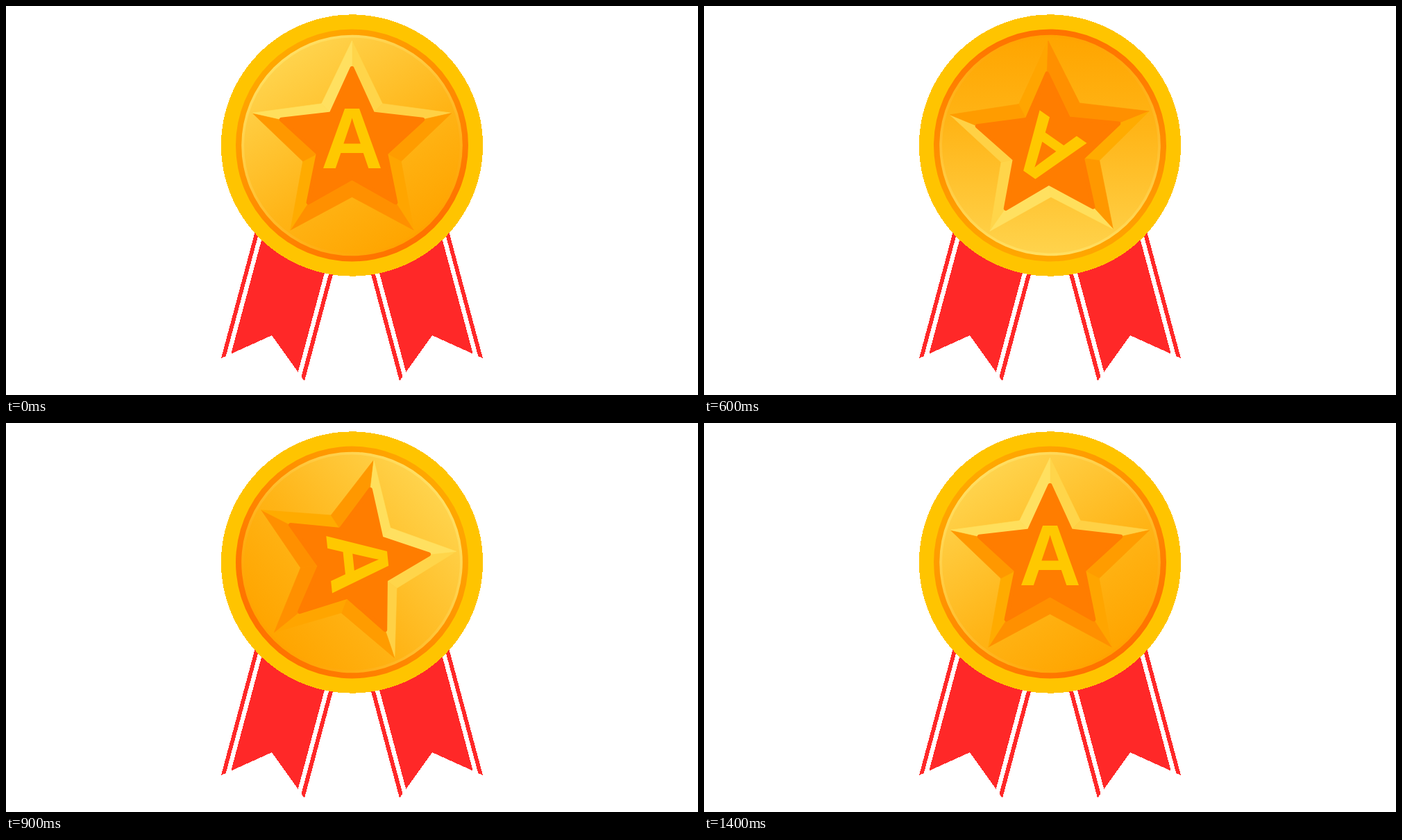
These frames come from a looping animation (997x561 px, 8000 ms). An HTML page:

```html
<!DOCTYPE html>
<html lang="en">
<head>
<meta charset="utf-8">
<title>Medal</title>
<style>
  html, body { margin: 0; width: 100%; height: 100%; overflow: hidden; background: #fff; }
  svg { display: block; width: 997px; height: 561px; }
  text { font: bold 123.5px "Liberation Sans", Arial, sans-serif; text-anchor: middle; fill: #ffc800; }
</style>
</head>
<body>
<svg viewBox="0 0 997 561">
  <defs>
    <linearGradient id="ring" gradientTransform="rotate(56 .5 .5)">
      <stop stop-color="#ffa800"/><stop offset="1" stop-color="#ff7200"/>
    </linearGradient>
    <linearGradient id="rim" gradientTransform="rotate(56 .5 .5)">
      <stop stop-color="#ffdf62"/><stop offset="1" stop-color="#ffa200"/>
    </linearGradient>
    <linearGradient id="disc" gradientTransform="rotate(56 .5 .5)">
      <stop stop-color="#ffd34c"/><stop offset=".6" stop-color="#ffb416"/><stop offset="1" stop-color="#ffa500"/>
    </linearGradient>
    <g id="ribbon" shape-rendering="crispEdges">
      <path d="M371 280L310 508L383 475L430 541L499.5 280Z" fill="#ff2828"/>
      <path d="M377 280L316 508V520H319L322.5 508L383.5 280Z
               M487 280L417.3 541H423.8L493.5 280Z" fill="#fff"/>
    </g>
  </defs>
  <g class="swing"><use href="#ribbon"/></g>
  <g class="swing"><use href="#ribbon" transform="matrix(-1 0 0 1 997 0)"/></g>
  <g transform="translate(498.5 201)">
    <circle r="188.6" fill="#ffc400" shape-rendering="crispEdges"/>
    <g id="face">
      <circle r="167.5" fill="url(#ring)"/>
      <circle r="159.3" fill="url(#rim)"/>
      <circle r="155.5" fill="url(#disc)"/>
      <g id="facets"></g>
      <path id="star" fill="#ff7d00" stroke="#ff7d00" stroke-width="6" stroke-linejoin="round"/>
      <text y="33">A</text>
    </g>
  </g>
</svg>
<script>
const $ = id => document.getElementById(id);

// Star corner i, counted clockwise in steps of 36 degrees from the top
function corner(i, tip, notch, dy = 0) {
  const r = i % 2 ? notch : tip, a = i * Math.PI / 5;
  return `${(r * Math.sin(a)).toFixed(2)} ${(dy - r * Math.cos(a)).toFixed(2)}`;
}
const outer = i => corner(i, 151, 74.5);
const inner = i => corner(i, 107, 51.1, -4.2);

const shades = ['#ffd54a', '#ffd145', '#ff9c00', '#ffa500', '#ff9000',
                '#ff9000', '#ffab00', '#ff9800', '#ffdf5c', '#ffe060'];
$('facets').innerHTML = shades.map((c, i) =>
  `<path fill="${c}" stroke="${c}" stroke-width=".6" stroke-linejoin="round" ` +
  `d="M${outer(i)}L${outer(i + 1)}L${inner(i + 1)}L${inner(i)}Z"/>`).join('');
$('star').setAttribute('d', 'M' + shades.map((_, i) => inner(i)).join('L') + 'Z');

// Turn of the face in degrees, one value per step
const STEP = 100, LOOP = 8000;
const turn = [0, 20, 40, 62, 85, 113, 145, 186, 229.5, 276, 321, 348, 358, 361, 360];
const ribbons = document.querySelectorAll('.swing');

function draw(now) {
  const k = Math.floor(now % LOOP / STEP);
  $('face').setAttribute('transform', `rotate(${-turn[Math.min(k, turn.length - 1)]})`);

  // Ribbons are dragged along briefly as the face comes to rest
  const drag = k > 10 && k < 14 ? 4.7 * Math.sin(Math.PI * (k - 10) / 4) : 0;
  ribbons.forEach((r, i) =>
    r.setAttribute('transform', `rotate(${-drag} ${i ? 585 : 412} 350)`));
}

let start;
function tick(now) {
  start ??= now;
  draw(now - start);
  requestAnimationFrame(tick);
}
draw(0);
requestAnimationFrame(tick);
</script>
</body>
</html>
```
